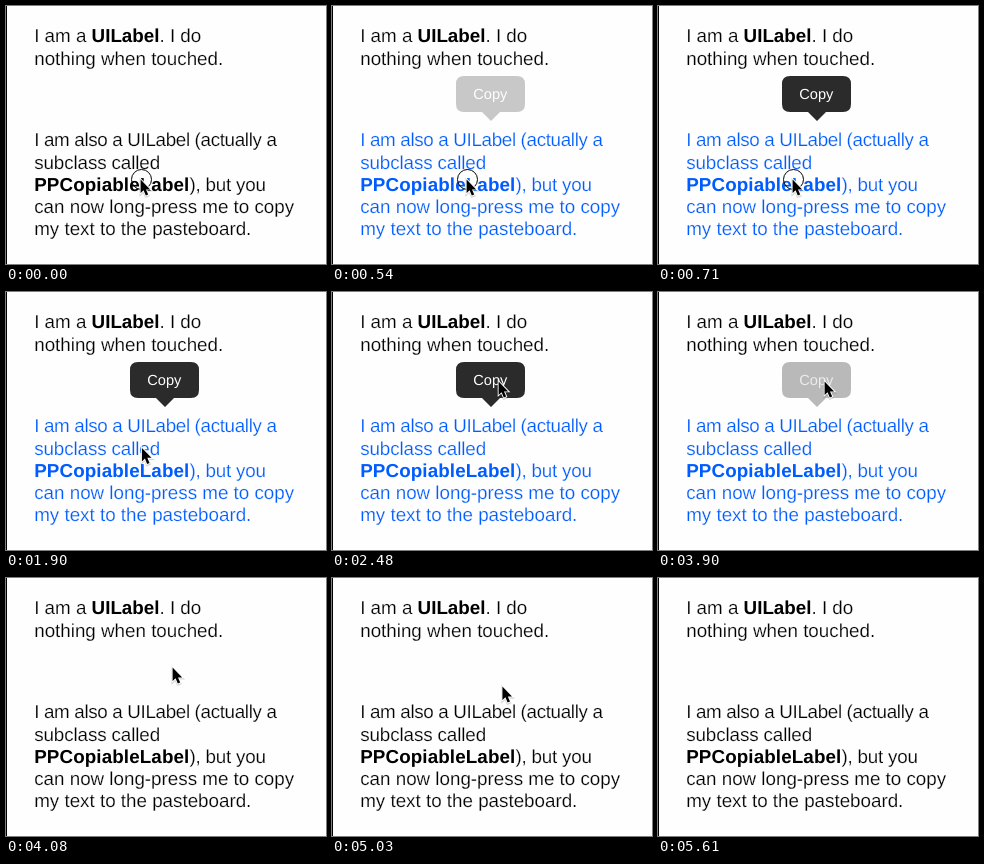
These frames come from a looping animation (320x258 px, 6140 ms). An HTML page:

```html
<!DOCTYPE html>
<html lang="en">
<head>
<meta charset="utf-8">
<title>Copiable label</title>
<style>
  html, body { margin: 0; width: 100%; height: 100%; overflow: hidden; background: #fefefe; }
  svg { display: block; width: 100vw; height: 100vh; }
  text {
    font-family: "Liberation Sans", Arial, sans-serif;
    white-space: pre;
    text-rendering: geometricPrecision;
  }
  /* a thin paper-coloured edge makes the regular weight look light */
  .label { font-size: 18.8px; stroke: #fefefe; stroke-width: .24px; }
  .label .b { font-weight: bold; stroke: none; }
  .copy { font-size: 14.6px; text-anchor: middle; }
</style>
</head>
<body>
<svg viewBox="0 0 320 258">
  <rect width="320" height="258" fill="#fefefe"/>
  <rect width="1" height="258" fill="#000"/>
  <g class="label" fill="#000">
    <text x="28.2" y="36.3">I am a <tspan class="b">UILabel</tspan>. I do</text>
    <text x="28.2" y="58.5">nothing when touched.</text>
  </g>
  <g class="label" id="para">
    <text x="28.2" y="140.4" letter-spacing="-.33">I am also a UILabel (actually a</text>
    <text x="28.2" y="162.6" letter-spacing="-.1">subclass called</text>
    <text x="28.2" y="184.9"><tspan class="b" letter-spacing=".12">PPCopiableLabel</tspan><tspan letter-spacing="-.2">), but you</tspan></text>
    <text x="28.2" y="207.1">can now long-press me to copy</text>
    <text x="28.2" y="229.4">my text to the pasteboard.</text>
  </g>
  <g id="menu">
    <path id="bubble" d="M132 70H185Q193 70 193 78V98Q193 106 185 106H168L159 115L150 106H132Q124 106 124 98V78Q124 70 132 70Z"/>
    <text id="copy" class="copy" x="158.3" y="92.8">Copy</text>
  </g>
  <circle id="ring" r="10" fill="none" stroke="#000"/>
  <g id="cursor">
    <path d="M0 1V14.5L3 11.7L5.2 17L7.6 16L5.4 10.9H9.6Z" stroke="#000" stroke-width="2.4" opacity=".16"/>
    <path d="M0 0V13.5L3 10.7L5.2 16L7.6 15L5.4 9.9H9.6Z" stroke="#fff" stroke-width="1.8" paint-order="stroke"/>
  </g>
</svg>
<script>
const LOOP = 6140, STEP = 58, STEPS = 11;
const HOME = [134.6, 173.5], BUTTON = [166.6, 89.5], EXIT = [280, 264];
const el = id => document.getElementById(id);
const [para, menu, bubble, copy, ring, cursor] =
  ["para", "menu", "bubble", "copy", "ring", "cursor"].map(el);
const show = (node, on) => node.setAttribute("visibility", on ? "visible" : "hidden");
const between = (t, a, b) => t >= a && t < b;

// Share of a stepped change that has been shown by time t
const stepped = (t, start, gap, count) =>
  Math.max(0, Math.min(count, Math.floor((t - start) / gap + 1e-6) + 1)) / count;

const bend = (a, c, b, u) =>
  a.map((v, i) => (1 - u) ** 2 * v + 2 * u * (1 - u) * c[i] + u * u * b[i]);

function pointer(t) {
  if (t < 5030) {
    const u = 1 - (1 - stepped(t, 1900, STEP, STEPS)) ** 1.8;
    return bend(HOME, [136.6, 115], BUTTON, u);
  }
  return bend(BUTTON, [184, 196], EXIT, stepped(t, 5030, STEP, STEPS));
}

function menuAlpha(t) {
  if (t < 3900) return stepped(t, 540, 56.6, 4);
  const k = stepped(t, 3900, 60, 4);
  return k === 1 ? 0 : 1.1 - 1.2 * k;
}

function draw(t) {
  para.setAttribute("fill", between(t, 540, 4080) ? "#005cff" : "#000");

  const pressed = t >= 2830;
  menu.setAttribute("opacity", menuAlpha(t));
  bubble.setAttribute("fill", pressed ? "#a9a9a9" : "#2b2b2b");
  copy.setAttribute("fill", pressed ? "#e8e8e8" : "#fff");

  const [x, y] = pointer(t);
  cursor.setAttribute("transform", `translate(${x} ${y})`);
  show(cursor, t < 5610);
  ring.setAttribute("transform", `translate(${x + 0.9} ${y})`);
  show(ring, t < 1360 || between(t, 2830, 3430));
}

const begin = performance.now();
function tick(now) {
  draw(Math.max(0, now - begin) % LOOP);
  requestAnimationFrame(tick);
}
draw(0);
requestAnimationFrame(tick);
</script>
</body>
</html>
```
